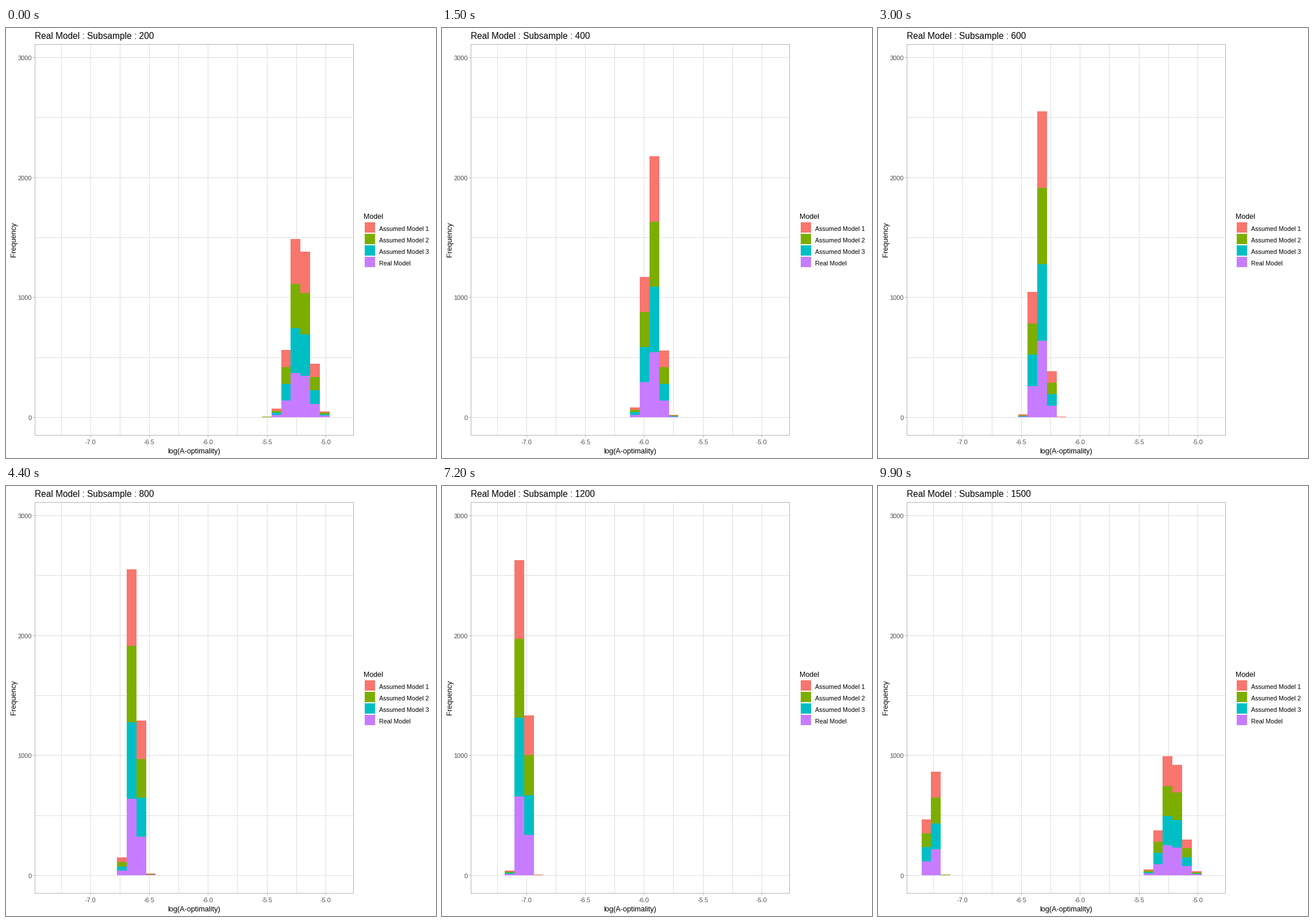
Animation of 748 by 748 pixels, one loop 10 s. Source, as a matplotlib script:

```python
import math

import matplotlib.pyplot as plt
import numpy as np
from matplotlib.animation import FuncAnimation
from matplotlib.patches import Rectangle

STAGE, DPI, FRAMES, INTERVAL = 748, 64, 100, 100
PX = 72 / DPI
BINS, BIN_X, BIN_W = 30, 75.68, 16.787
BASE_Y, UNIT_Y = 677.5, 0.2087
SIZES = range(200, 1501, 100)
MODELS = [("Assumed Model 1", "#F8766D"), ("Assumed Model 2", "#7CAE00"),
          ("Assumed Model 3", "#00BFC4"), ("Real Model", "#C77CFF")]
STACK_COLORS = [color for _, color in reversed(MODELS)]


def stacked_tops(size):
    """Stacked counts per bin: 1000 normal draws for each of the four models."""
    growth = math.log(size / 200)
    mean = np.polyval([-0.0234, 0.1527, -12.524, 25.93], growth)
    spread = 0.93 * (200 / size) ** 0.53
    cdf = [0.5 * (1 + math.erf((k - mean) / spread / math.sqrt(2)))
           for k in range(BINS + 1)]
    return np.outer(np.diff(cdf), 1000 * np.arange(1, 5))


STATES = [stacked_tops(size) for size in SIZES]
# First frame and number of steps of each move; the first three are longer
MOVES = [(4 + 8 * i, 4) if i < 3 else (7 + 7 * i, 3)
         for i in range(len(STATES))]


def timeline(frame):
    """Current state and the share of the move to the next one."""
    for i, (start, steps) in enumerate(MOVES):
        if frame < start + steps - 1:
            return i, max(0, frame - start + 1) / steps
    return 0, 0


plt.rcParams["font.family"] = "Liberation Sans"
fig = plt.figure(figsize=(STAGE / DPI, STAGE / DPI), dpi=DPI, facecolor="white")
ax = fig.add_axes([0, 0, 1, 1])
ax.set(xlim=(0, STAGE), ylim=(STAGE, 0))
ax.axis("off")


def box(x, y, w, h, color, z=1):
    patch = Rectangle((x, y), w, h, facecolor=color, linewidth=0,
                      antialiased=False, zorder=z)
    return ax.add_patch(patch)


def label(x, y, text, size, color="black", **kw):
    return ax.text(x, y, text, fontsize=size * PX, color=color,
                   va="baseline", rotation_mode="anchor", **kw)


def value_y(value):
    return math.floor(BASE_Y - UNIT_Y * value)


GRID, FRAME_COLOR, TICK_TEXT = "#DEDEDE", "#B3B3B3", "#4D4D4D"
LEFT, TOP, RIGHT, BOTTOM = 50, 28, 604, 708

for i in range(10):
    x = round(96.2 + 51.05 * i)
    box(x, TOP, 1, BOTTOM - TOP, GRID)
    if i % 2:
        box(x, BOTTOM, 1, 4, FRAME_COLOR)
        label(x - 0.2, 724, f"{-7.25 + 0.25 * i:.1f}", 11, TICK_TEXT, ha="center")
for value in range(0, 3001, 500):
    y = value_y(value)
    box(LEFT, y, RIGHT - LEFT, 1, GRID)
    if value % 1000 == 0:
        box(LEFT - 3, y, 3, 1, FRAME_COLOR)
        label(45, y + 5, str(value), 11, TICK_TEXT, ha="right")

for x in (LEFT, RIGHT):
    box(x, TOP, 1, BOTTOM - TOP + 1, FRAME_COLOR, 4)
for y in (TOP, BOTTOM):
    box(LEFT, y, RIGHT - LEFT + 1, 1, FRAME_COLOR, 4)

title = label(50, 19, "", 15.5)
label(327.5, 740, "log(A-optimality)", 12.6, ha="center")
label(17, 368, "Frequency", 12.8, rotation=90, ha="center")
label(622.3, 332, "Model", 12.5)
for i, (name, color) in enumerate(MODELS):
    box(624, 338 + 20 * i, 18, 18, color)
    label(649, 353 + 20 * i, name, 10.75)

edges = [round(BIN_X + BIN_W * k) for k in range(BINS + 1)]
bars = [[box(a, BASE_Y, b - a, 0, color, 3) for color in STACK_COLORS]
        for a, b in zip(edges, edges[1:])]


def update(frame):
    state, share = timeline(frame)
    following = (state + 1) % len(STATES)
    tops = (1 - share) * STATES[state] + share * STATES[following]
    closest = following if share >= 0.5 and following else state
    title.set_text(f"Real Model : Subsample : {SIZES[closest]}")
    for stack, values in zip(bars, tops):
        lower = value_y(0)
        for bar, value in zip(stack, values):
            upper = value_y(value)
            bar.set_y(upper)
            bar.set_height(lower - upper)
            bar.set_visible(lower > upper)
            lower = upper
    return []


anim = FuncAnimation(fig, update, frames=FRAMES, interval=INTERVAL,
                     repeat=True, repeat_delay=0, blit=False)
plt.show()
```
